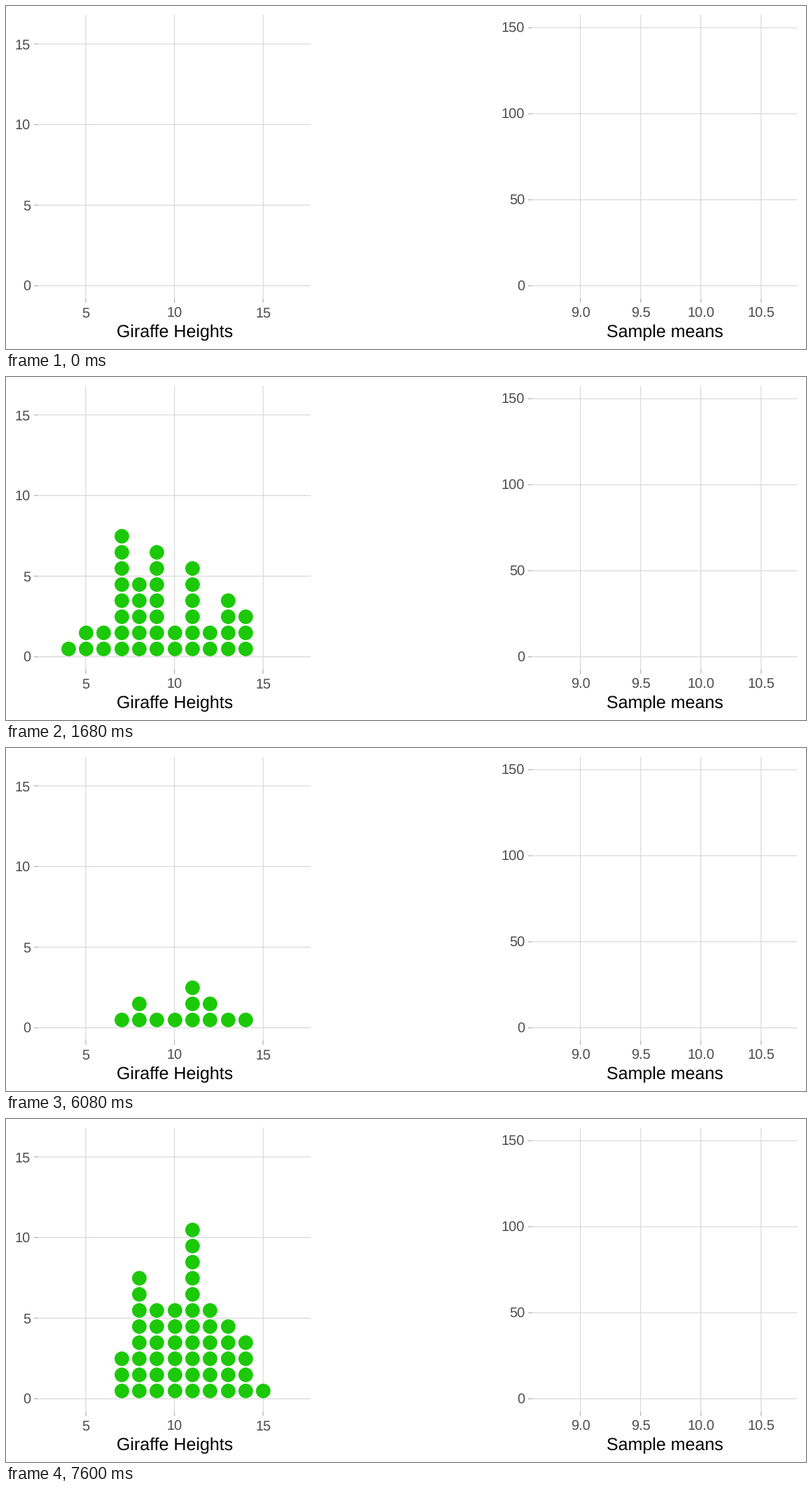
Animation of 1143x490 px, one loop 8 s. Source, as a matplotlib script:

```python
import numpy as np
import matplotlib.pyplot as plt
from matplotlib.animation import FuncAnimation
from matplotlib.patches import Polygon

W, H, DPI = 1143, 490, 72  # at 72 dpi one point is one pixel
STEP_MS, FRAMES = 80, 100
CYCLE = 70                 # steps from one sample to the next
MEAN_AT = 30               # step at which the mean appears
GRID, TICK, LABEL, GREEN = "#d8d8d8", "#b3b3b3", "#4d4d4d", "#1bc908"
THIN, MEDIUM, THICK = 1.21, 2.42, 4.84

# Heights in drawing order, two per step.
SAMPLES = [
    [7, 13, 5, 9, 7, 6, 8, 13, 7, 10, 7, 5, 11, 9, 13, 6, 8, 7,
     14, 9, 11, 8, 11, 9, 7, 12, 14, 9, 11, 4, 8, 9, 7, 13, 11,
     10, 14, 9, 8, 11, 12, 7, 5, 11, 10, 13, 10, 9, 12, 10],
    [11, 8, 12, 14, 9, 11, 10, 13, 11, 8, 7, 12, 11, 15, 9, 14, 11,
     8, 13, 12, 9, 11, 10, 13, 8, 11, 14, 9, 12, 10, 11, 8, 13, 7,
     11, 10, 12, 14, 9, 13, 8, 11, 7, 11, 12, 8, 10, 9, 10, 8],
]

plt.rcParams["font.family"] = "Liberation Sans"
plt.rcParams["text.hinting"] = "none"
fig = plt.figure(figsize=(W / DPI, H / DPI), dpi=DPI, facecolor="white")
ax = fig.add_axes([0, 0, 1, 1])
ax.set_xlim(0, W)
ax.set_ylim(H, 0)
ax.axis("off")


def line(x0, y0, x1, y1, color="black", width=THIN, z=1, **kw):
    kw.setdefault("solid_capstyle", "butt")
    return ax.plot([x0, x1], [y0, y1], color=color, lw=width, zorder=z,
                   snap=False, **kw)[0]


def label(x, y, s, size, color="black", ha="center"):
    return ax.text(x, y, s, size=size, color=color, ha=ha, va="baseline", zorder=4)


def left_x(v):
    return 114 + (v - 5) * 25.33


def left_y(v):
    return 399.7 - v * 23.04


def right_x(v):
    return 820.6 + (v - 9) * 172.2


def right_y(v):
    return 399.7 - v * 2.458


def panel(left, right, fx, fy, xs, ys, x_format, title):
    top, bottom, tick = 12.5, 418, 6.2
    for v in ys:
        y = fy(v)
        line(left, y, right, y, GRID)
        line(left - tick, y, left, y, TICK)
        label(left - 11, y + 7.2, str(v), 20, LABEL, "right")
    for v in xs:
        x = fx(v)
        line(x, top, x, bottom, GRID)
        line(x, bottom, x, bottom + tick, TICK)
        label(x, 444.3, format(v, x_format), 20, LABEL)
    label((left + right) / 2, 472.5, title, 25)


def arrow(x0, y0, x1, y1):
    """Thick arrow with a closed, rounded 30 degree head."""
    start, tip = np.array([x0, y0]), np.array([x1, y1])
    along = (tip - start) / np.hypot(*(tip - start))
    side = np.array([-along[1], along[0]]) * 10.2
    base = tip - along * 17.7
    head = Polygon([tip, base + side, base - side], closed=True, fc="black",
                   ec="black", lw=THICK, joinstyle="round", zorder=4)
    ax.add_patch(head)
    return [line(x0, y0, *base, width=THICK, z=4), head]


def mean_parts(mean):
    x = left_x(mean)
    dash = line(x, 418.5, x, 12.5, width=MEDIUM, z=3,
                linestyle=(0, (4, 4)), dash_capstyle="butt")
    formula = [
        label(484, 229, "x", 46, ha="left"),
        line(484, 197.3, 508, 197.3, width=2, z=4),
        label(506.5, 236, "1", 32, ha="left"),
        line(535.5, 213.3, 558.5, 213.3, width=3.6, z=4),
        line(535.5, 220.5, 558.5, 220.5, width=3.6, z=4),
        label(568.5, 229, f"{mean:.2f}", 46, ha="left"),
    ]
    across = arrow(473.5, 268, 670, 268)
    down = arrow(right_x(mean), right_y(20), right_x(mean), right_y(4))
    return [dash, *formula, *across, *down]


def stack(values):
    """Pixel centres of the dots, each on top of its column."""
    heights, points = {}, []
    for v in values:
        row = heights.get(v, 0)
        heights[v] = row + 1
        points.append((left_x(v), left_y(row + 0.5)))
    return np.array(points).reshape(-1, 2)


panel(46, 435.5, left_x, left_y, (5, 10, 15), (0, 5, 10, 15), "d", "Giraffe Heights")
panel(752, 1130.5, right_x, right_y, (9, 9.5, 10, 10.5), (0, 50, 100, 150),
      ".1f", "Sample means")
dots = ax.scatter([], [], s=20.8 ** 2, color=GREEN, linewidths=0, zorder=2)
mean_art = mean_parts(np.mean(SAMPLES[0]))


def draw(frame):
    sample, step = divmod(frame, CYCLE)
    dots.set_offsets(stack(SAMPLES[sample][:2 * step]))
    for part in mean_art:
        part.set_visible(step >= MEAN_AT)
    return [dots, *mean_art]


anim = FuncAnimation(fig, draw, frames=FRAMES, interval=STEP_MS,
                     init_func=lambda: draw(0), repeat=True, repeat_delay=0)
plt.show()
```
